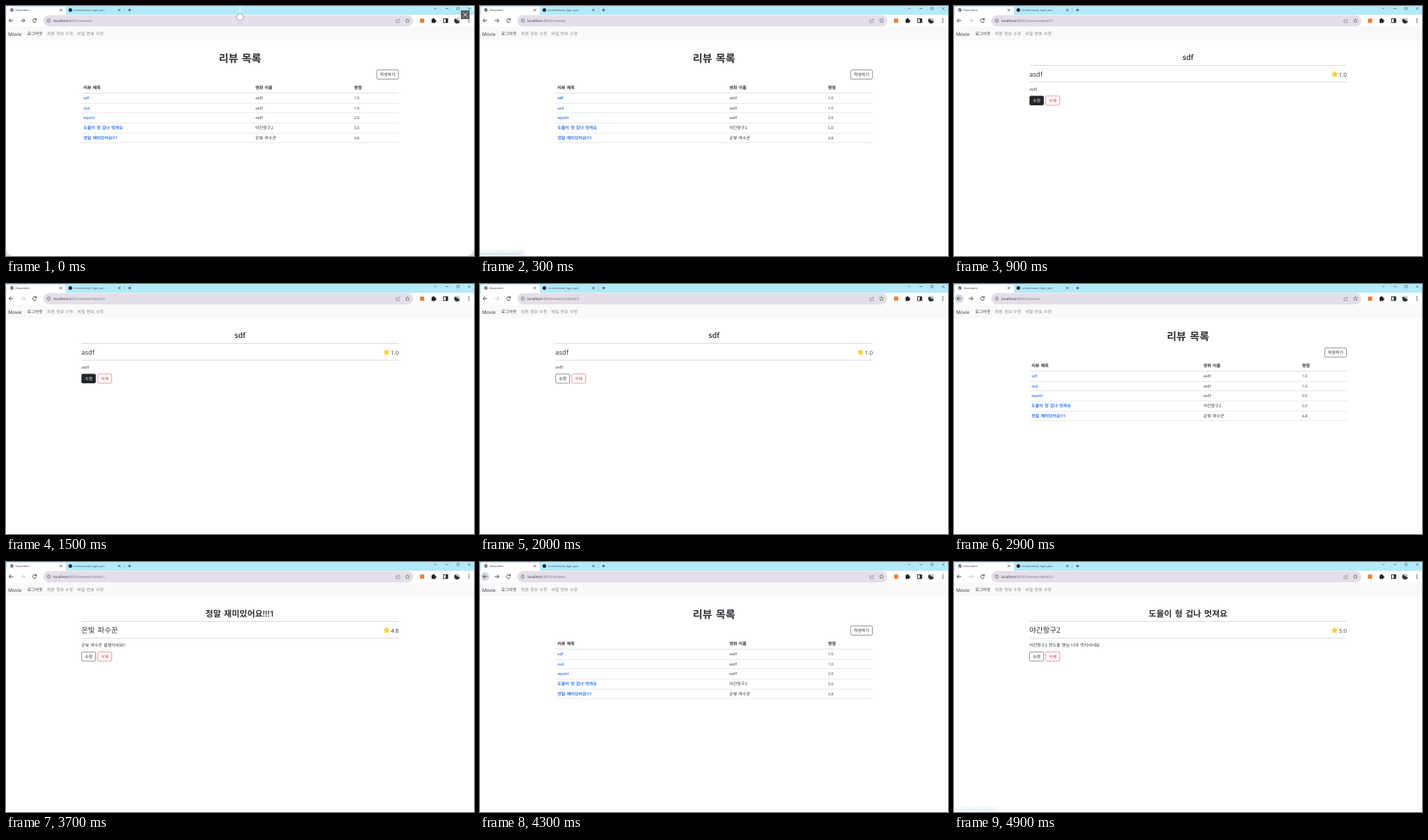
Recreate the animation shown at these times as an HTML page. Size 640x343 px, loop 5000 ms.

```html
<!DOCTYPE html>
<html lang="ko">
<head>
<meta charset="utf-8">
<title>Movie reviews</title>
<style>
html, body { margin: 0; width: 100%; height: 100%; overflow: hidden; background: #fff; }
svg { display: block; width: 100%; height: 100%; }
text { font-family: "Open Sans", "Noto Sans CJK KR", "Noto Sans CJK", sans-serif; word-spacing: .1em; text-rendering: geometricPrecision; white-space: pre; }
</style>
</head>
<body>
<svg id="stage" viewBox="0 0 640 343" preserveAspectRatio="none"></svg>
<script>
const LOOP = 5000, STEP = 100;
const INK = '#212529', RED = '#dc3545';
const reviews = [
  { id: 5, title: 'sdf', movie: 'asdf', score: '1.0', body: 'asdf' },
  { id: 4, title: 'asd', movie: 'asdf', score: '1.0', body: 'asdf' },
  { id: 3, title: 'wpahr', movie: 'asdf', score: '2.0', body: 'asdf' },
  { id: 2, title: '도율이 형 겁나 멋져요', movie: '야간항구2', score: '5.0', body: '야간항구2 한도율 형님 너무 멋지시네요' },
  { id: 1, title: '정말 재미있어요!!!1', movie: '은빛 파수꾼', score: '4.8', body: '은빛 파수꾼 꿀잼이네요!!' }
];

// Page shown from each time on; 0 is the list, other numbers are review ids
const pages = [[0, 0], [400, 5], [2200, 0], [2500, 4], [2800, 0], [3400, 1], [4200, 0], [4700, 2]];
const backHover = [[2100, 2300], [2700, 3000], [4100, 4400]];
const linkHover = [[200, 400, 5], [2400, 2500, 4], [3200, 3400, 1], [4500, 4700, 2]];
const editHover = [[900, 1300], [1500, 1700]];
const deleteHover = [[1300, 1500]];
const statusBar = [[300, 600, 'detail/5'], [1100, 1500, '5/update'], [2400, 2700, 'detail/4'],
  [3200, 3600, 'detail/1'], [4500, 4960, 'detail/2']];

const clamp = v => Math.max(0, Math.min(1, v));
const active = (spans, t) => spans.find(([a, b]) => t >= a && t < b);

// size is in page pixels at three times the stage scale; y is the middle of the line
function text(x, y, size, str, { fill = '#2c3034', bold = false, anchor = 'start' } = {}) {
  const s = size / 3 * (/[가-힣]/.test(str) ? 1.08 : .97);
  return `<text x="${x}" y="${y + s * .36}" font-size="${s}" fill="${fill}" font-weight="${bold ? 600 : 400}" text-anchor="${anchor}">${str}</text>`;
}
const rect = (x, y, w, h, fill, extra = '') =>
  `<rect x="${x}" y="${y}" width="${w}" height="${h}" fill="${fill}" ${extra}/>`;
const circle = (x, y, r, fill, extra = '') =>
  `<circle cx="${x}" cy="${y}" r="${r}" fill="${fill}" ${extra}/>`;
const line = (d, color = '#333', w = .8) =>
  `<path d="${d}" fill="none" stroke="${color}" stroke-width="${w}"/>`;
const cross = (x, y, r, color, w) =>
  line(`M${x - r} ${y - r}l${2 * r} ${2 * r}m0 ${-2 * r}l${-2 * r} ${2 * r}`, color, w);

function star(x, y, r, attrs) {
  const pts = Array.from({ length: 10 }, (_, i) => {
    const a = i * Math.PI / 5, d = i % 2 ? r * .5 : r;
    return `${x + d * Math.sin(a)},${y - d * Math.cos(a)}`;
  });
  return `<polygon points="${pts.join(' ')}" stroke-linejoin="round" ${attrs}/>`;
}

function button(x, y, w, label, color, on) {
  return rect(x + .4, y, w - .8, 12.6, on ? color : '#fff', `rx="1.8" stroke="${color}" stroke-width=".5"`) +
    text(x + w / 2, y + 6.3, 16, label, { fill: on ? '#fff' : color, anchor: 'middle' });
}

function arrow(x, dir, color) {
  return line(`M${x - 2.8 * dir} 20h${5.6 * dir}m${-2.6 * dir} -2.7l${2.6 * dir} 2.7l${-2.6 * dir} 2.7`, color, .8);
}

function browser(page, hoverBack) {
  const gray = '#75777b';
  return rect(0, 0, 640, 12, '#b3eaf9') +
    rect(1, 1, 81, 13, '#fff', 'rx="2"') +
    circle(8, 5.5, 2.4, '#5f6368') + line('M6 5l2 1l-.5 1.4M8.6 3.6l1.2 1.6', '#fff', .6) +
    text(13, 5.5, 12, 'Document') + cross(75, 5.5, 1.7, '#333', .7) +
    circle(88, 5.5, 2.5, '#24292f') + text(93, 5.5, 11.6, 'mirelo/movie_login_pair', { fill: '#3c4a50' }) +
    cross(155, 5.5, 1.7, '#333', .7) + line('M162 2.5v6', '#7fa9b2', .5) +
    line('M166.7 5.5h4.6M169 3.2v4.6', '#222', .7) +
    line('M585.6 2.6l1.6 1.5l1.6 -1.5M601 3.5h4', '#444', .6) +
    rect(616.8, 2, 3, 3, 'none', 'stroke="#444" stroke-width=".5"') + cross(633.5, 3.5, 1.6, '#444', .6) +
    rect(0, 12, 640, 17, '#fff') +
    (hoverBack ? circle(7, 20, 6, '#d5dae2') : '') +
    arrow(7, -1, '#222') + arrow(23, 1, page ? '#b5b7ba' : '#222') +
    line('M41 18.4a2.5 2.5 0 1 0 .5 2.2M41.4 17v2h-2', '#222', .8) +
    rect(51, 12.4, 506, 15.6, '#e4dee9', 'rx="7.8"') +
    circle(58.5, 20, 2.3, 'none', 'stroke="#555" stroke-width=".6"') + line('M58.5 19.7v1.7M58.5 18.5v.6', '#555', .6) +
    text(65, 20, 15, `localhost<tspan fill="${gray}">:8000/reviews/${page ? 'detail/' + page : ''}</tspan>`) +
    line('M535 18.8h-1.7v4h5v-1.4M535 21.3q.4 -2.5 3.2 -2.5m-1.4 -1.5l1.6 1.5l-1.6 1.5', gray, .6) +
    star(549, 20.2, 3, `fill="none" stroke="#555" stroke-width=".6"`) +
    rect(566, 17.3, 6, 5.6, '#f0803c', 'rx=".8"') +
    rect(582, 18, 5.2, 5.2, '#222', 'rx=".6"') + circle(584.6, 17.8, 1.2, '#222') + circle(587.4, 20.6, 1.2, '#222') +
    rect(598.4, 17.4, 5.6, 5.4, 'none', 'stroke="#222" stroke-width=".9"') + rect(601.4, 17.4, 2.8, 5.4, '#222') +
    circle(617, 20, 4, '#c4d0d8') + '<path d="M614 17.3a4 4 0 1 0 6.6 4.3z" fill="#333"/>' +
    [17.8, 20, 22.2].map(y => circle(633, y, .7, '#222')).join('') +
    rect(0, 28.6, 640, 18.6, '#f9f8fa') +
    text(3, 38.3, 20, 'Movie') +
    text(29, 38, 16, '로그아웃', { fill: '#38393b' }) +
    text(56, 38, 16, '회원 정보 수정', { fill: '#87898b' }) +
    text(97.5, 38, 16, '비밀 번호 수정', { fill: '#87898b' });
}

function listPage(hoverId) {
  const bold = { bold: true };
  let out = text(320, 72, 40, '리뷰 목록', { bold: true, anchor: 'middle' }) +
    button(506.5, 87.7, 30.5, '작성하기', INK) +
    text(106, 112, 16, '리뷰 제목', bold) + text(341, 112, 16, '영화 이름', bold) +
    text(476, 112, 16, '평점', bold) + rect(103, 119, 434, 1, '#dfe2e2');
  reviews.forEach((r, i) => {
    const y = 126.2 + i * 13.67;
    out += text(106, y, 16, r.title, { bold: true, fill: r.id === hoverId ? '#0a58ca' : '#2f74f5' }) +
      text(341, y, 16, r.movie) + text(476, y, 16, r.score) +
      rect(103, Math.round(y + 6.6), 434, 1, '#e9ebea');
  });
  return out;
}

function detailPage(r, t) {
  return text(320, 70.5, 32, r.title, { bold: true, anchor: 'middle' }) +
    rect(103, 81, 434, 1, '#dcd9db') +
    text(103, 93.5, 28, r.movie) +
    star(520.4, 93.8, 4.2, 'fill="#fcd02f" stroke="#fcd02f" stroke-width=".8"') +
    text(537, 94, 23, r.score, { anchor: 'end' }) +
    rect(103, 104, 434, 1, '#e8dbde') +
    text(103, 113.7, 16, r.body) +
    button(103, 123.4, 20, '수정', INK, active(editHover, t)) +
    button(125, 123.4, 20, '삭제', RED, active(deleteHover, t));
}

function status(t) {
  const s = active(statusBar, t);
  if (!s) return '';
  const alpha = clamp(Math.min((t - s[0] + 100) / 200, (s[1] - t) / 200));
  return `<g opacity="${alpha}">` + rect(-1, 336, 61, 8, '#e2f5fc', 'rx="1" stroke="#b3c6ce" stroke-width=".6"') +
    text(1, 340, 12, 'localhost:8000/reviews/' + s[2], { fill: '#5b7480' }) + '</g>';
}

function captureOverlay(t) {
  const alpha = clamp(1 - t / 200);
  if (!alpha) return '';
  return `<g opacity="${alpha}">` +
    line('M320 0v10', '#fff', 1) + circle(320, 15, 4.6, '#fff', 'stroke="#8a8f94" stroke-width=".8"') +
    line('M1 7v-6h6M633 1h6v6', '#fff', 1) +
    line('M1 336v6h6M633 342h6v-6', '#aaa', .8) +
    rect(622, 6, 12, 12, '#5c6064') + cross(628, 12, 2.6, '#fff', .8) + '</g>';
}

function scene(t) {
  const page = pages.filter(p => p[0] <= t).pop()[1];
  const link = active(linkHover, t);
  return rect(0, 0, 640, 343, '#fff') + browser(page, active(backHover, t)) +
    (page ? detailPage(reviews.find(r => r.id === page), t) : listPage(link && link[2])) +
    status(t) + captureOverlay(t);
}

const stage = document.getElementById('stage');
const start = performance.now();
let shown = -1;
function frame() {
  const t = Math.floor((performance.now() - start) % LOOP / STEP) * STEP;
  if (t !== shown) stage.innerHTML = scene(shown = t);
  requestAnimationFrame(frame);
}
frame();
</script>
</body>
</html>
```
